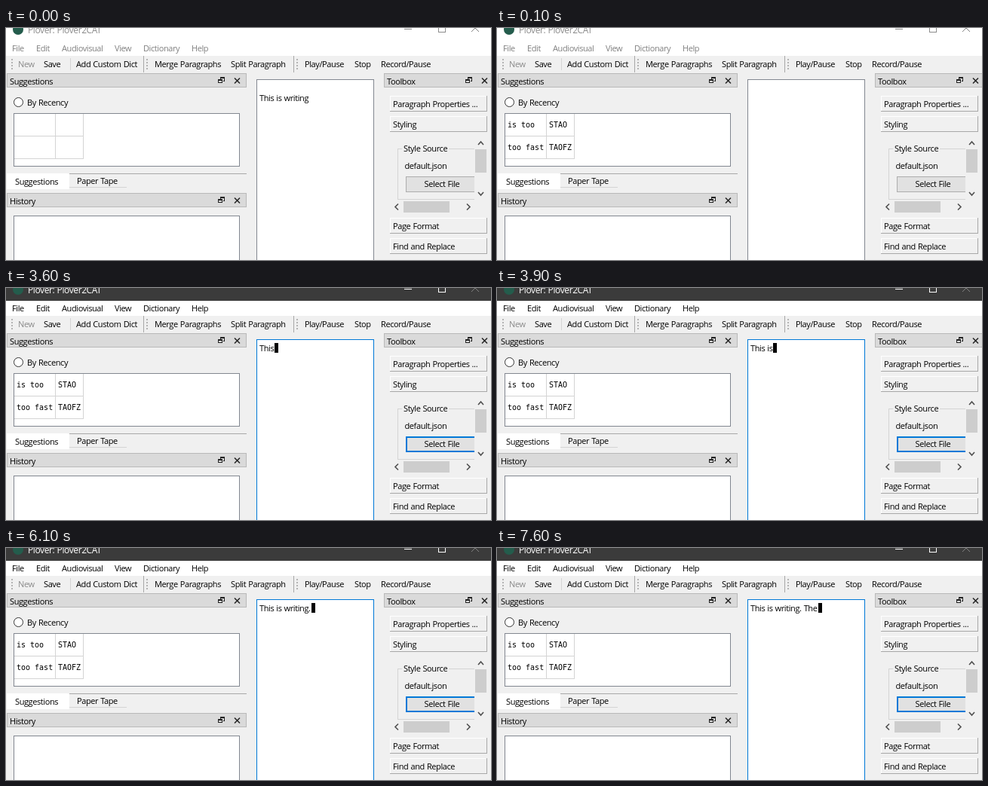
These frames come from a looping animation (643 px wide and 308 px high, 8000 ms). An HTML page:

```html
<!DOCTYPE html>
<html lang="en">
<head>
<meta charset="utf-8">
<title>Steno editor</title>
<style>
  html, body { margin: 0; width: 100%; height: 100%; overflow: hidden; }
  svg { display: block; --bar: #fff; --caption: #8c8c8c; --menu: #808080; --edge: #828790; --button: #adadad; }
  svg.active { --bar: #3b3b3b; --caption: #fff; --menu: #000; --edge: #0078d7; --button: #0078d7; }
  text { font: 11px "Open Sans", "Noto Sans", sans-serif; letter-spacing: -.4px; word-spacing: .6px; white-space: pre; }
  .mono text { font: 10px "DejaVu Sans Mono", monospace; letter-spacing: 0; word-spacing: 0; }
  .mid { text-anchor: middle; }
  rect, .line { shape-rendering: crispEdges; }
  .line { fill: none; stroke: #d4d4d4; }
  .dark { stroke: #a8a8a8; }
  .box { fill: #fff; stroke: #828790; }
  .dock { fill: #dadada; stroke: #b9b9b9; }
  .thumb { fill: #cdcdcd; }
  .arrow { fill: none; stroke: #505050; stroke-width: 1.6; }
  .grip { stroke: #b4b4b4; stroke-width: 2; stroke-dasharray: 2 2; }
  .menu { fill: var(--menu); }
  .off { fill: #8a8a8a; }
</style>
</head>
<body>
<svg width="643" height="308" viewBox="0 0 643 308">
  <defs>
    <g id="controls" fill="none" stroke="#222">
      <path class="line" style="stroke:#222" d="M2.5 2.5v-3h5v5h-2M-.5 2.5h5v4h-5zM-.5 3.5h5M2.5 .5h5"/>
      <path d="M21 .5l7 7m0-7l-7 7" stroke-width="1.5"/>
    </g>
    <g id="tool">
      <rect width="129" height="21" fill="#f0f0f0"/>
      <path class="line" style="stroke:#fff" d="M.5 20V.5h128"/>
      <path class="line dark" d="M0 20.5h128.5V0"/>
    </g>
  </defs>

  <rect width="643" height="308" fill="#f0f0f0"/>
  <rect width="643" height="17" fill="var(--bar)"/>
  <rect y="17" width="643" height="20" fill="#fff"/>
  <circle cx="16" cy="2" r="7" fill="#245c4c"/>
  <text x="29" y="6.5" style="font-size:12px" fill="var(--caption)">Plover: Plover2CAT</text>
  <path class="line" style="stroke:var(--caption)" d="M528 1.5h10M573.5-4v9h9V-4"/>
  <path d="M617-5l10 10m0-10l-10 10" stroke="#808080"/>

  <g class="menu">
    <text x="8" y="31">File</text><text x="40" y="31">Edit</text>
    <text x="74" y="31">Audiovisual</text><text x="144" y="31">View</text>
    <text x="182" y="31">Dictionary</text><text x="246" y="31">Help</text>
  </g>

  <path class="line" d="M85.5 40v16"/>
  <path class="line dark" d="M182.5 37v22M381.5 37v22"/>
  <path class="line grip" d="M8 41v15M187 41v15M386 41v15"/>
  <text class="off" x="16" y="52">New</text>
  <text x="50" y="52">Save</text>
  <text x="93" y="52">Add Custom Dict</text>
  <text x="197" y="52">Merge Paragraphs</text>
  <text x="298" y="52">Split Paragraph</text>
  <text x="396" y="52">Play/Pause</text>
  <text x="462" y="52">Stop</text>
  <text x="497" y="52">Record/Pause</text>

  <rect class="dock" x="1.5" y="60.5" width="317" height="18"/>
  <rect class="dock" x="1.5" y="219.5" width="317" height="18"/>
  <rect class="dock" x="501.5" y="60.5" width="142" height="18"/>
  <use href="#controls" x="282" y="66"/>
  <use href="#controls" x="282" y="225"/>
  <use href="#controls" x="610" y="66"/>
  <text x="5" y="75">Suggestions</text>
  <text x="5" y="234">History</text>
  <text x="505" y="75">Toolbox</text>

  <circle cx="16.5" cy="98.5" r="6" fill="#fff" stroke="#333"/>
  <text x="28" y="103">By Recency</text>
  <rect class="box" x="10.5" y="113.5" width="299" height="70"/>
  <path class="line" d="M65.5 114v60M102.5 114v60M11 143.5h92M11 173.5h92"/>
  <g id="strokes" class="mono">
    <text x="14" y="132">is too</text><text x="69" y="132">STAO</text>
    <text x="14" y="162">too fast</text><text x="69" y="162">TAOFZ</text>
  </g>
  <path class="line dark" d="M84 193.5h235"/>
  <path class="line" d="M84 211.5h76"/>
  <rect x="1" y="193" width="83" height="21" fill="#fff"/>
  <text x="12" y="208">Suggestions</text>
  <text x="94" y="207">Paper Tape</text>
  <rect class="box" x="10.5" y="249.5" width="299" height="70"/>

  <rect x="332.5" y="68.5" width="155" height="250" fill="#fff" stroke="var(--edge)"/>
  <text id="typed" x="336"></text>
  <rect id="caret" y="73" width="5" height="13"/>

  <use href="#tool" x="509" y="90"/>
  <use href="#tool" x="509" y="117"/>
  <use href="#tool" x="509" y="252"/>
  <use href="#tool" x="509" y="279"/>
  <text x="513" y="105">Paragraph Properties ...</text>
  <text x="513" y="132">Styling</text>
  <text x="513" y="267">Page Format</text>
  <text x="513" y="294">Find and Replace</text>

  <path class="line" d="M525 160.5h-5.5v67h101.5M587 160.5h34"/>
  <text x="527" y="164">Style Source</text>
  <text x="528.5" y="187">default.json</text>
  <rect x="530" y="197" width="91" height="21" fill="var(--button)"/>
  <rect id="face" fill="#e1e1e1"/>
  <text class="mid" x="578" y="211">Select File</text>
  <rect class="thumb" x="622" y="161" width="15" height="31"/>
  <rect class="thumb" x="527" y="230" width="61" height="15"/>
  <path class="arrow" d="M626 155l3.5-4 3.5 4M626 218l3.5 4 3.5-4M520 233.5l-4 4 4 4M611 233.5l4 4-4 4"/>
</svg>
<script>
  const LOOP = 8000;
  // [start ms, typed text, caret x]; no caret while the window is inactive
  const steps = [
    [0, "This is writing"],
    [100, ""],
    [1800, "", 337],
    [3600, "This", 356],
    [3900, "This is", 366],
    [5000, "This is writing", 401],
    [6100, "This is writing.", 405],
    [7600, "This is writing. The", 426],
  ];
  const $ = selector => document.querySelector(selector);
  const svg = $("svg"), typed = $("#typed"), caret = $("#caret"), face = $("#face");
  const set = (el, attrs) => Object.entries(attrs).forEach(([key, value]) => el.setAttribute(key, value));
  const show = (el, on) => set(el, { visibility: on ? "visible" : "hidden" });

  function draw(now) {
    const t = now % LOOP;
    const [start, text, caretX] = steps.findLast(step => step[0] <= t);
    const active = caretX !== undefined;
    const border = active ? 2 : 1;
    svg.classList.toggle("active", active);
    set(face, { x: 530 + border, y: 197 + border, width: 91 - border, height: 21 - 2 * border });
    show($("#strokes"), start > 0);
    show(caret, active);
    set(caret, { x: caretX ?? 0 });
    set(typed, { y: start ? 84 : 97 });
    typed.textContent = text;
    requestAnimationFrame(draw);
  }
  draw(performance.now());
</script>
</body>
</html>
```
